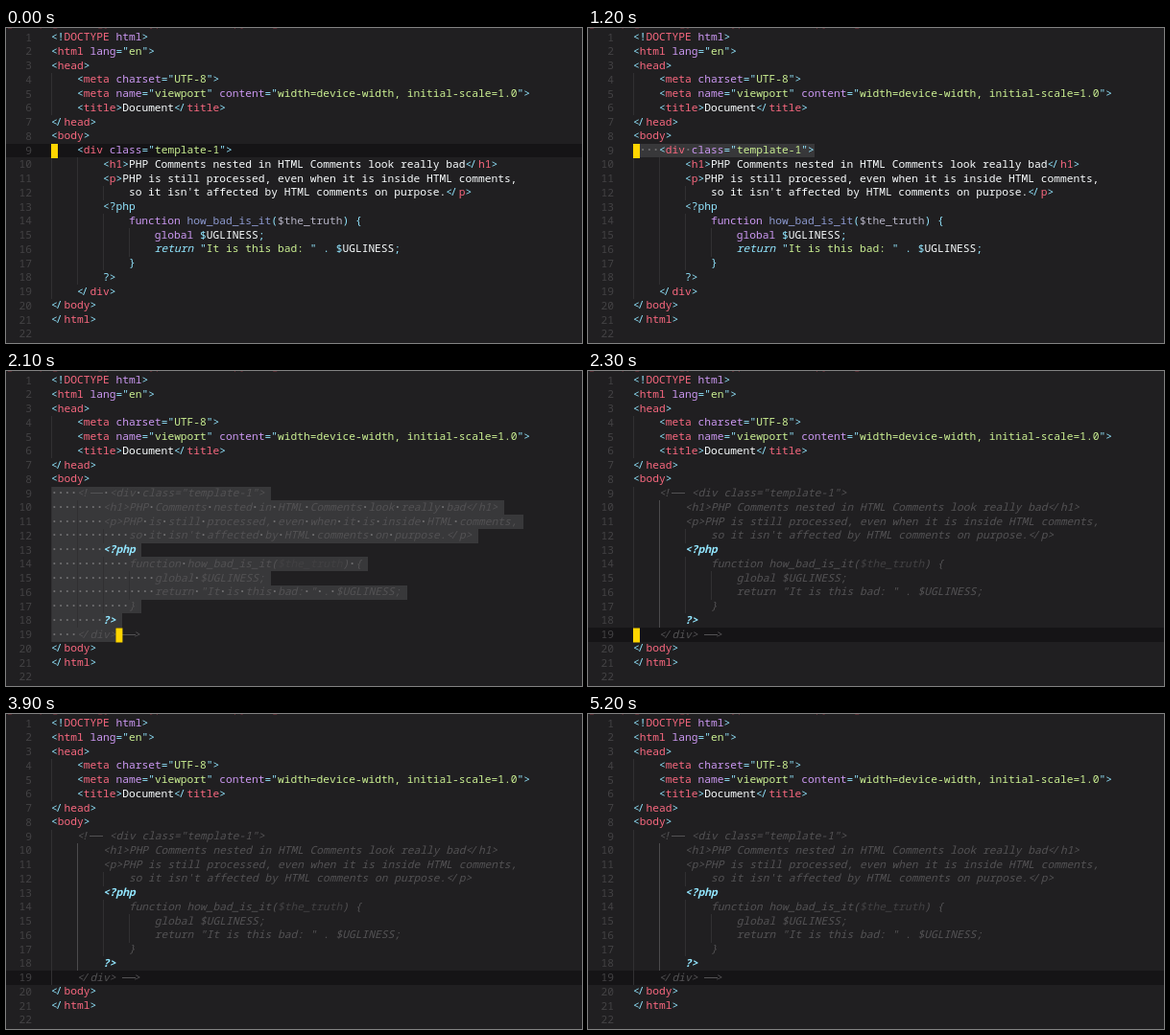
These frames come from a looping animation (600x329 px, 5.3 s). An HTML page:

```html
<!DOCTYPE html>
<html lang="en">
<head>
<meta charset="UTF-8">
<title>Commenting out a block</title>
<style>
  html, body { margin: 0; width: 100%; height: 100%; overflow: hidden; background: #201f21; }
  #stage {
    position: relative; width: 600px; height: 329px; overflow: hidden;
    background: #201f21; color: #fafeff;
    font: 500 11.24px/14.75px "Noto Sans Mono", "DejaVu Sans Mono", monospace;
    font-variant-ligatures: none;
  }
  #stage div { position: absolute; white-space: pre; }
  .layer { inset: 0; }
  .row { left: 0; width: 600px; height: 14.75px; }
  .band { background: #151416; }
  .num { right: 573px; color: #434244; font-weight: 400; }
  .code { left: 47px; top: -.4px; }
  .sel { left: 47px; height: 14.85px; background: #38383a; }
  .guide { width: 1px; height: 14.75px; background: #313032; }
  .guide.lit { background: #4c4b4d; }
  .crumb { left: 1px; top: -12.6px; color: #8a3843; opacity: .6; }

  .c { color: #92e6ff; }
  .t { color: #f8687f; }
  .a, .k { color: #cb98f2; }
  .s { color: #cbf092; }
  .f { color: #8c99cf; }
  .v { color: #b4b2c4; }
  .ret { color: #92e6ff; font-style: italic; }
  .note { color: #535254; font-style: italic; font-weight: 400; }
  .note .dim { color: #424143; }
  .php { color: #92e6ff; font-style: italic; font-weight: bold; }
  u { color: #747375; font: normal bold 1em/1 "Noto Sans Mono", "DejaVu Sans Mono", monospace; text-decoration: none; }
  .r { position: relative; left: -1.9px; }
  .dash { color: transparent; background: linear-gradient(#535254, #535254) 0 57% / 100% 1px no-repeat; }

  #plain { animation: plain 5.3s step-end infinite; }
  #line { animation: line 5.3s step-end infinite; }
  #block { animation: block 5.3s step-end infinite; }
  #noted { animation: noted 5.3s step-end infinite; }
  #done { animation: done 5.3s step-end infinite; }
  @keyframes plain { 0% { opacity: 1 } 22.64%, 100% { opacity: 0 } }
  @keyframes line { 0% { opacity: 0 } 22.64% { opacity: 1 } 26.41%, 100% { opacity: 0 } }
  @keyframes block { 0% { opacity: 0 } 26.41% { opacity: 1 } 30.18%, 100% { opacity: 0 } }
  @keyframes noted { 0% { opacity: 0 } 30.18% { opacity: 1 } 43.39%, 100% { opacity: 0 } }
  @keyframes done { 0% { opacity: 0 } 43.39%, 100% { opacity: 1 } }

  #caret {
    left: 47px; top: 121px; width: 1ch; height: 14.6px; background: #ffd500;
    animation: move 5.3s step-end infinite, blink 5.3s step-end infinite;
  }
  @keyframes move {
    0% { transform: none }
    26.41% { transform: translate(10ch, 147.5px) }
    43.39%, 100% { transform: translate(0, 147.5px) }
  }
  @keyframes blink {
    0% { opacity: 1 } 11.32% { opacity: 0 } 20.75% { opacity: 1 }
    52.83% { opacity: 0 } 62.26% { opacity: 1 }
    71.69% { opacity: 0 } 81.13% { opacity: 1 } 90.56%, 100% { opacity: 0 }
  }
</style>
</head>
<body>
<div id="stage"></div>
<script>
const source = `<!DOCTYPE html>
<html lang="en">
<head>
    <meta charset="UTF-8">
    <meta name="viewport" content="width=device-width, initial-scale=1.0">
    <title>Document</title>
</head>
<body>
    <div class="template-1">
        <h1>PHP Comments nested in HTML Comments look really bad</h1>
        <p>PHP is still processed, even when it is inside HTML comments,
            so it isn't affected by HTML comments on purpose.</p>
        <?php
            function how_bad_is_it($the_truth) {
                global $UGLINESS;
                return "It is this bad: " . $UGLINESS;
            }
        ?>
    </div>
</body>
</html>
`.split('\n');

const FIRST = 9, LAST = 19;
const stage = document.getElementById('stage');

const esc = s => s.replace(/</g, '&lt;').replace(/>/g, '&gt;')
  .replace(/&lt;\//g, '&lt;<span class="r">/</span>')
  .replace(/·/g, '<u>·</u>');
const span = (cls, s) => `<span class="${cls}">${esc(s)}</span>`;
const div = (cls, style, html = '') => `<div class="${cls}" style="${style}">${html}</div>`;

const rules = [
  [/^<\?php|^\?>/, m => span('c', m[0])],
  [/^(<[!\/]?)(\w+)/, m => span('c', m[1]) + span('t', m[2])],
  [/^"([^"]*)"/, m => span('c', '"') + span('s', m[1]) + span('c', '"')],
  [/^(function|global)\b/, m => span('k', m[0])],
  [/^return\b/, m => span('ret', m[0])],
  [/^\w+(?==)|^html(?=>)/, m => span('a', m[0])],
  [/^how_bad_is_it/, m => span('f', m[0])],
  [/^\$the_truth/, m => span('v', m[0])],
  [/^\.(?=[ ·])|^[$<>=;(){}]/, m => span('c', m[0])],
  [/^\w+|^[^]/, m => esc(m[0])]
];

function colour(text) {
  let html = '';
  while (text) {
    for (const [re, paint] of rules) {
      const m = re.exec(text);
      if (!m) continue;
      html += paint(m);
      text = text.slice(m[0].length);
      break;
    }
  }
  return html;
}

function mute(text) {
  if (/\?/.test(text)) return span('php', text);
  const html = esc(text)
    .replace('--&gt;', '<span class="dash">--</span><span class="r">&gt;</span>')
    .replace('&lt;!--', '&lt;<span class="r">!</span><span class="dash">--</span>')
    .replace('$the_truth', '<span class="dim">$the_truth</span>');
  return `<span class="note">${html}</span>`;
}

// Columns selected on line n, newline included where the selection runs on.
function selected(n, text, range) {
  if (range === 'line') return n === FIRST ? text.length : 0;
  if (range === 'block') return n === LAST ? 10 : text.length + 1;
  return 0;
}

function row(n, { band, range, noted, lit } = {}) {
  let text = source[n - 1];
  if (noted && n === FIRST) text = text.replace('<', '<!-- <');
  if (noted && n === LAST) text += ' -->';
  const cols = selected(n, text, range);
  const indent = text.search(/\S|$/);
  let html = div('num', '', n);
  if (cols) html += div('sel', `width:${cols}ch`);
  for (let c = 0; c < indent; c += 4) {
    html += div(lit && c === 4 ? 'guide lit' : 'guide', `left:calc(47px + ${c}ch)`);
  }
  const shown = text.slice(0, cols).replace(/ /g, '·') + text.slice(cols);
  html += div('code', '', noted ? mute(shown) : colour(shown));
  return div(n === band ? 'row band' : 'row', `top:${2.6 + 14.75 * (n - 1)}px`, html);
}

function layer(id, from, to, state) {
  let html = '';
  for (let n = from; n <= to; n++) html += row(n, state);
  return `<div class="layer" id="${id}">${html}</div>`;
}

stage.innerHTML =
  div('crumb', '', 'g,   page  ;  gy,   (type)   ,   copy  ; g  ,') +
  layer('head', 1, FIRST - 1) +
  layer('foot', LAST + 1, source.length) +
  layer('plain', FIRST, LAST, { band: FIRST }) +
  layer('line', FIRST, LAST, { range: 'line' }) +
  layer('block', FIRST, LAST, { range: 'block' }) +
  layer('noted', FIRST, LAST, { range: 'block', noted: true }) +
  layer('done', FIRST, LAST, { band: LAST, noted: true, lit: true }) +
  '<div id="caret"></div>';
</script>
</body>
</html>
```
